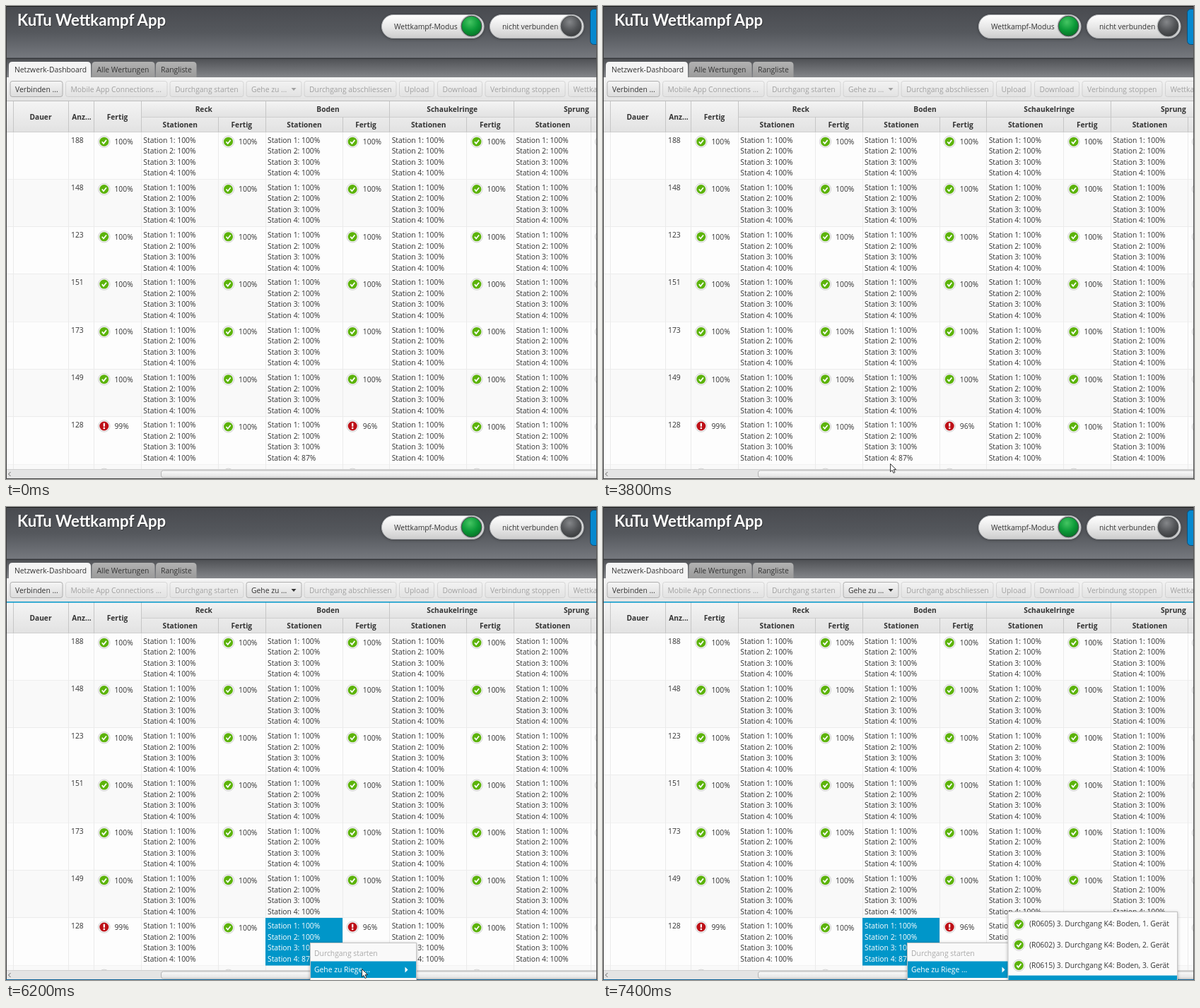
An HTML page that plays this animation: 836x670 px, repeating every 8 s.

```html
<!DOCTYPE html>
<html lang="de">
<head>
<meta charset="utf-8">
<title>Wettkampf Dashboard</title>
<style>
  html, body { margin: 0; width: 100%; height: 100%; overflow: hidden; background: #fbfbfb; }
  svg { display: block; width: 100%; height: 100%; }
  text { font: 10.35px "Open Sans", "Noto Sans", sans-serif; fill: #333; white-space: pre; }
  .bold { font-size: 10.2px; font-weight: 700; text-anchor: middle; }
  .title { font: 700 22.2px Lato, sans-serif; fill: #fff; }
  .shadow { fill: #222; opacity: .6; }
  .white { fill: #fff; }
</style>
</head>
<body>
<svg id="stage" viewBox="0 0 836 670">
  <defs id="defs">
    <radialGradient id="green" cx=".42" cy=".3" r=".75">
      <stop offset="0" stop-color="#45c563"/><stop offset=".55" stop-color="#0c9a38"/><stop offset="1" stop-color="#066d25"/>
    </radialGradient>
    <radialGradient id="grey" cx=".42" cy=".3" r=".75">
      <stop offset="0" stop-color="#85878a"/><stop offset=".55" stop-color="#55575a"/><stop offset="1" stop-color="#37393b"/>
    </radialGradient>
    <filter id="soft" x="-10%" y="-30%" width="120%" height="160%">
      <feDropShadow dx="0" dy="1" stdDeviation="2" flood-opacity=".3"/>
    </filter>
  </defs>
</svg>
<script>
const BLUE = '#0096c9', LINE = '#cfcfcf', LOOP = 8000, STEP = 200;
const stage = document.getElementById('stage');

function add(parent, tag, attrs = {}, content) {
  const node = document.createElementNS('http://www.w3.org/2000/svg', tag);
  for (const key in attrs) node.setAttribute(key, attrs[key]);
  if (content !== undefined) node.textContent = content;
  parent.appendChild(node);
  return node;
}
const group = (parent = stage, attrs) => add(parent, 'g', attrs);
const rect = (p, x, y, width, height, fill, more) => add(p, 'rect', { x, y, width, height, fill, ...more });
const path = (p, d, fill, more) => add(p, 'path', { d, fill, ...more });
const circle = (p, cx, cy, r, fill, more) => add(p, 'circle', { cx, cy, r, fill, ...more });
const text = (p, x, y, content, cls = '') => add(p, 'text', { x, y, class: cls }, content);
const show = (node, visible) => node.setAttribute('visibility', visible ? 'inherit' : 'hidden');

function gradient(id, ...colors) {
  const node = add(document.getElementById('defs'), 'linearGradient', { id, x2: 0, y2: 1 });
  colors.forEach((color, i) => add(node, 'stop', { offset: i / (colors.length - 1), 'stop-color': color }));
  return `url(#${id})`;
}
const fills = {
  header: gradient('header', '#484a4f', '#55585d', '#777a80'),
  tabBand: gradient('tabBand', '#505256', '#85878b'),
  pill: gradient('pill', '#ffffff', '#e9e9e9', '#cdcdcd'),
  tab: gradient('tab', '#b2b2b2', '#999999'),
  bar: gradient('bar', '#f4f4f4', '#e3e3e3'),
  button: gradient('button', '#f5f5f5', '#dcdcdc'),
  head: gradient('head', '#f4f4f4', '#e2e2e2'),
  thumb: gradient('thumb', '#fbfbfb', '#e2e2e2')
};

function statusIcon(p, x, y, ok = true) {
  circle(p, x, y, 8.2, '#f3f3f3', { stroke: '#cfcfcf', 'stroke-width': .9 });
  circle(p, x, y, 6.5, ok ? '#5cb30a' : '#bd1017');
  if (ok) path(p, `M${x - 3} ${y}l2.2 2.7l4-5`, 'none', { stroke: '#fff', 'stroke-width': 1.7 });
  else {
    rect(p, x - 1.1, y - 4.2, 2.2, 5, '#fff');
    circle(p, x, y + 3, 1.3, '#fff');
  }
}

function stations(p, x, y, last, cls) {
  [100, 100, 100, last].forEach((pct, i) =>
    text(p, x, y + i * 15.5, `Station ${i + 1}: ${pct}%`, cls));
}

// Table body
const ROW = 67.3, TOP = 178.5, PITCH = 175.7;
const table = group();
const rowTop = i => TOP + ROW * i;
const deviceX = k => 191.3 + PITCH * k;
rect(table, 0, 135, 836, 522, '#fbfbfb');
[188, 148, 123, 151, 173, 149, 128, ''].forEach((count, row) => {
  const y = rowTop(row);
  rect(table, 0, y, 836, ROW, row % 2 ? '#f9f9f9' : '#fdfdfd');
  rect(table, 0, Math.round(y + ROW) - 1, 836, 1, '#ececec');
  text(table, 92, y + 15, count);
  for (let k = 0; k < 5; k++) {
    const ok = row !== 6 || k % 2 === 1 || k > 2;
    const x = 124.2 + PITCH * k, dy = ok ? 0 : -1;
    statusIcon(table, x + 14.6, y + 13.7 + dy, ok);
    text(table, x + 29.2, y + 17.5 + dy, ok ? '100%' : k ? '96%' : '99%');
    if (k < 4) stations(table, deviceX(k) + 3, y + 15, row === 6 && k === 1 ? 87 : 100);
  }
});

// Table header and column lines
rect(table, 0, 135, 836, 44, fills.head);
rect(table, 191, 135, 645, 22, fills.head);
rect(table, 191, 157, 645, 1, LINE);
rect(table, 0, 178, 836, 1, LINE);
function column(x, headTop) {
  rect(table, Math.round(x) - 1, headTop, 1, 179 - headTop, '#c6c6c6');
  rect(table, Math.round(x) - 1, 179, 1, 478, '#ebebeb');
}
[11, 89, 125].forEach(x => column(x, 135));
text(table, 49, 160.5, 'Dauer', 'bold');
text(table, 107, 160.5, 'Anz...', 'bold');
text(table, 157.5, 160.5, 'Fertig', 'bold');
['Reck', 'Boden', 'Schaukelringe', 'Sprung'].forEach((device, k) => {
  const x = deviceX(k);
  column(x + .5, 135);
  column(x + 109.5, 157);
  text(table, x + 88.5, 150, device, 'bold');
  text(table, x + 55, 171.5, 'Stationen', 'bold');
  text(table, x + 142, 171.5, 'Fertig', 'bold');
});

const selection = group();
rect(selection, 367, 582, 109, 67.5, BLUE);
stations(selection, deviceX(1) + 3, rowTop(6) + 15, 87, 'white');

// Horizontal scroll bar
const chrome = group();
rect(chrome, 0, 656, 836, 14, '#e4e4e4');
rect(chrome, 0, 656, 836, 1, '#d0d0d0');
rect(chrome, 219.5, 658, 640, 10, fills.thumb, { rx: 3, stroke: '#b5b5b5' });
path(chrome, 'M6.5 660l-3 3l3 3', 'none', { stroke: '#666' });

// Window header
rect(chrome, 0, 0, 836, 75, fills.header);
rect(chrome, 0, 73.5, 836, 1.5, '#35373a');
rect(chrome, 0, 75, 836, 27, fills.tabBand);
text(chrome, 17, 29, 'KuTu Wettkampf App', 'title shadow');
text(chrome, 16, 28, 'KuTu Wettkampf App', 'title');

function pill(x, width, label, lamp) {
  rect(chrome, x, 12.5, width, 33, fills.pill, { rx: 16.5, stroke: '#b4b6b9', filter: 'url(#soft)' });
  text(chrome, x + 17.5, 33, label);
  circle(chrome, x + width - 17.5, 28.5, 16, '#b9bbbd');
  circle(chrome, x + width - 17.5, 28.5, 14.3, `url(#${lamp})`, { stroke: '#4b4d4f' });
}
pill(531.5, 144.5, 'Wettkampf-Modus', 'green');
pill(684.5, 132.5, 'nicht verbunden', 'grey');
rect(chrome, 826.5, 4.5, 30, 50, '#0789cf', { rx: 5, stroke: '#0a4f7a' });

function tab(x, width, label, active) {
  path(chrome, `M${x} 102v-18q0-5 5-5h${width - 10}q5 0 5 5v18z`, active ? '#f4f4f4' : fills.tab);
  text(chrome, x + (active ? 8 : 7), 94, label);
}
tab(4, 116, 'Netzwerk-Dashboard', true);
tab(121.5, 89, 'Alle Wertungen');
tab(212, 57.5, 'Rangliste');

// Toolbar
rect(chrome, 0, 101, 836, 34, fills.bar);
const focusTop = rect(chrome, 0, 134, 836, 1, '#bcbcbc');
function button(x, width, label, enabled) {
  const g = group(chrome, { opacity: enabled ? 1 : .4 });
  rect(g, x + .5, 106.5, width - 1, 22, fills.button, { rx: 3, stroke: '#aeaeae' });
  text(g, x + 7.5, 121.5, label);
  return g;
}
button(5.5, 75, 'Verbinden ...', true);
button(84, 144.5, 'Mobile App Connections ...');
button(231.5, 105, 'Durchgang starten');
const goTo = button(339.5, 79, 'Gehe zu ...');
path(goTo, 'M403.5 116h7l-3.5 4z', '#333');
button(421.5, 131, 'Durchgang abschliessen');
button(556, 50, 'Upload');
button(610, 64, 'Download');
button(677.5, 114, 'Verbindung stoppen');
button(795, 90, 'Wettkampf');

// Window frame
rect(chrome, 0, 0, 836, 1, '#1c1c1c');
rect(chrome, 0, 0, 1, 670, '#3c3c3c');
rect(chrome, 835, 0, 1, 670, '#555');
const focusBottom = rect(chrome, 0, 669, 836, 1, '#444');

// Context menu
const menu = group();
rect(menu, 430.5, 617.5, 150, 80, '#f9f9f9', { stroke: '#c4c4c4', filter: 'url(#soft)' });
text(menu, 436, 635.5, 'Durchgang starten').style.fill = '#aaa';
const menuBar = rect(menu, 431, 643.5, 149, 23.5, BLUE);
const menuLabel = text(menu, 436, 659, 'Gehe zu Riege ...');
const menuArrow = path(menu, 'M564.5 651.5l4 4l-4 4z', '#333');

const submenu = group();
rect(submenu, 573, 573.5, 239.5, 130, '#fbfbfb', { stroke: '#c4c4c4', filter: 'url(#soft)' });
const items = ['R0605', 'R0602', 'R0615', 'R0608'].map((code, i) => {
  const y = 576 + 29.2 * i;
  const bar = rect(submenu, 573.5, y, 238.5, 29.2, BLUE);
  statusIcon(submenu, 588.3, y + 15);
  const label = text(submenu, 603, y + 18.3, `(${code}) 3. Durchgang K4: Boden, ${i + 1}. Gerät`);
  return { bar, label };
});

const cursor = path(stage, 'M.5 .5v11.3l2.6-2.4l1.8 4.1l2-.9l-1.8-4h3.5z', '#fff',
  { stroke: '#222', 'stroke-width': .9 });

// Pointer way points: time, x, y
const route = [
  [800, 780, 142], [1400, 624, 473], [1800, 540, 579], [2400, 503, 606], [3000, 479.5, 627],
  [3800, 406, 648], [4200, 418, 644], [4400, 425, 640], [5000, 425, 640], [5400, 431.5, 625],
  [5600, 431.5, 625], [6200, 503, 654], [6400, 505, 655], [6600, 505, 655],
  [6800, 560, 650], [7000, 600, 622], [7200, 606, 648], [7400, 610, 672], [LOOP, 610, 672]
];
function pointer(t) {
  const i = Math.max(1, route.findIndex(point => point[0] >= t));
  const [t0, x0, y0] = route[i - 1], [t1, x1, y1] = route[i];
  const k = (t - t0) / (t1 - t0);
  return [x0 + (x1 - x0) * k, y0 + (y1 - y0) * k];
}

function render(now) {
  const t = Math.floor(now % LOOP / STEP) * STEP;
  const selected = t >= 4800, hovered = t >= 6000;
  const active = t < 7000 ? 0 : t < 7200 ? 1 : t < 7400 ? 2 : 3;

  show(selection, selected);
  goTo.setAttribute('opacity', selected ? 1 : .4);
  focusTop.setAttribute('fill', selected ? BLUE : '#bcbcbc');
  focusTop.setAttribute('height', selected ? 1.5 : 1);
  focusBottom.setAttribute('fill', t >= 4400 ? '#0a5f96' : '#444');

  show(menu, t >= 5800);
  show(menuBar, hovered);
  menuLabel.style.fill = hovered ? '#fff' : '#333';
  menuArrow.setAttribute('fill', hovered ? '#fff' : '#333');
  show(submenu, t >= 6400);
  items.forEach(({ bar, label }, i) => {
    show(bar, i === active);
    label.style.fill = i === active ? '#fff' : '#333';
  });

  show(cursor, t >= 800);
  if (t >= 800) cursor.setAttribute('transform', `translate(${pointer(t)})`);
}

const start = performance.now();
function tick() {
  render(performance.now() - start);
  requestAnimationFrame(tick);
}
tick();
</script>
</body>
</html>
```
